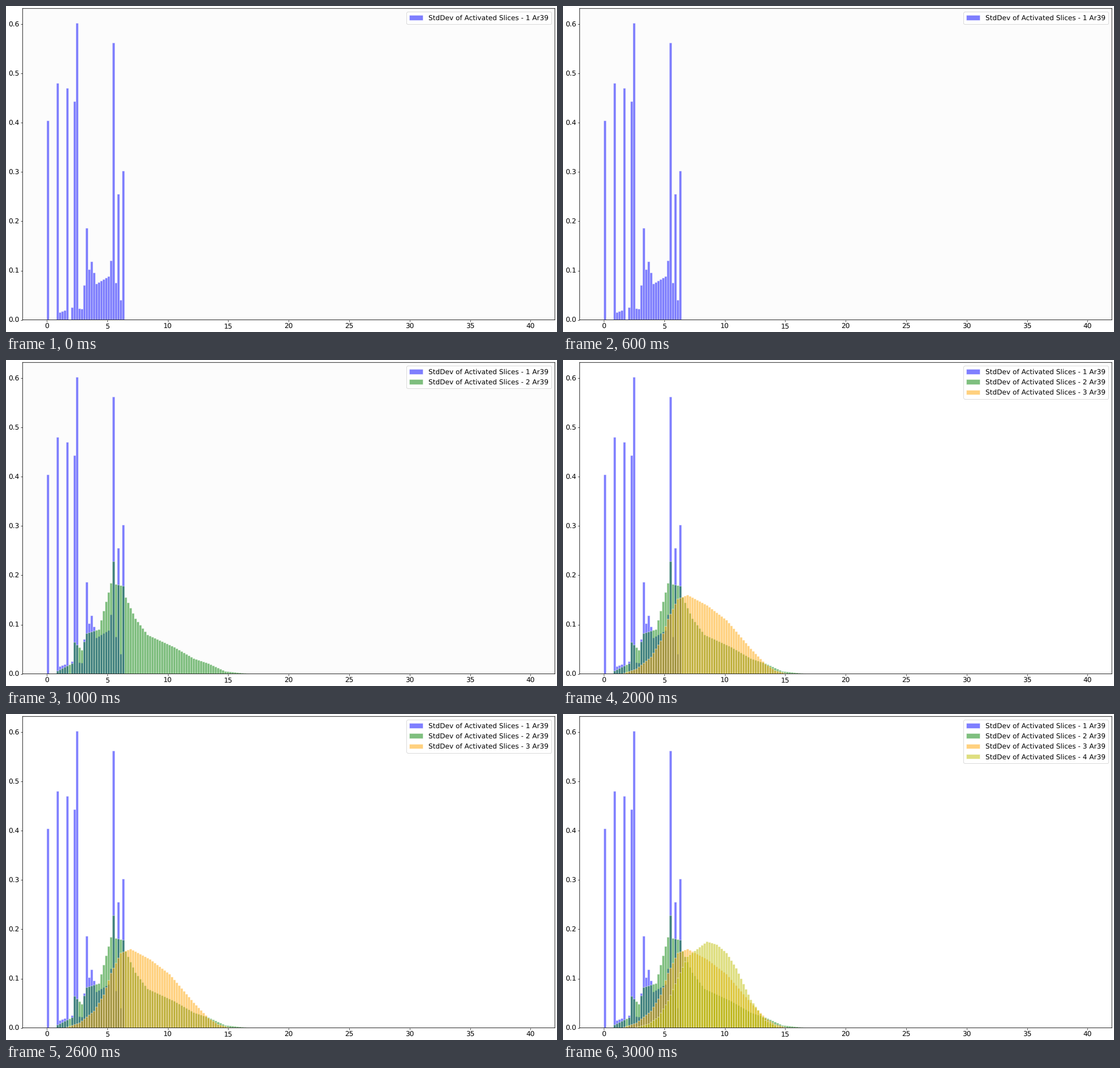
Animation of 973x576 px, one loop 4 s. Source, as a matplotlib script:

```python
import matplotlib.pyplot as plt
import numpy as np
from matplotlib.animation import FuncAnimation

WIDTH, HEIGHT, DPI = 973, 576, 64
LEFT, RIGHT, TOP, BOTTOM = 29.3, 969.2, 4.3, 554.6
EDGES = np.linspace(0, 40, 200)
BINS = np.arange(len(EDGES) - 1)

plt.rcParams.update({
    "font.family": "DejaVu Sans",
    "font.size": 13.6,
    "text.hinting": "none",
    "axes.linewidth": 0.95,
})


def density(*knots, spikes=()):
    """Straight slopes between (bin, height) knots, with single tall bins."""
    heights = np.interp(BINS, *zip(*knots))
    for position, height in spikes:
        heights[position] = height
    return heights


SERIES = [
    ("blue", density(
        (4, 0), (5, .015), (10, .025), (14, .022), (15, .07), (18, .118),
        (20, .073), (25, .088), (26, .12), (28, .075), (30, .04), (31, 0),
        spikes=[(0, .404), (4, .48), (8, .47), (9, 0), (11, .443), (12, .602),
                (16, .186), (27, .562), (29, .255), (31, .302)])),
    ("green", density(
        (3, 0), (4, .006), (10, .021), (11, .064), (14, .048), (16, .082),
        (21, .09), (26, .184), (31, .178), (32, .155), (36, .112), (41, .079),
        (52, .054), (60, .031), (66, .021), (73, .005), (83, 0),
        spikes=[(27, .228)])),
    ("orange", density(
        (7, 0), (13, .01), (19, .034), (23, .067), (26, .111), (30, .152),
        (34, .16), (42, .139), (50, .109), (60, .051), (66, .02), (70, .007),
        (75, 0))),
    ("y", density(
        (12, 0), (18, .008), (22, .022), (26, .055), (30, .101), (34, .145),
        (42, .175), (46, .169), (50, .152), (54, .121), (60, .057), (66, .015),
        (72, 0))),
]

fig = plt.figure(figsize=(WIDTH / DPI, HEIGHT / DPI), dpi=DPI,
                 facecolor="white")
ax = fig.add_axes([LEFT / WIDTH, 1 - BOTTOM / HEIGHT,
                   (RIGHT - LEFT) / WIDTH, (BOTTOM - TOP) / HEIGHT])


def draw(step):
    ax.clear()
    ax.set_facecolor("#fcfcfc" if step < 2 else "white")
    for count, (color, heights) in enumerate(SERIES[:step + 1], 1):
        ax.bar(EDGES[:-1], heights, EDGES[1], align="edge", color=color,
               edgecolor="white", linewidth=1, alpha=0.5, snap=False,
               label=f"StdDev of Activated Slices - {count} Ar39")
    for spine in ax.spines.values():
        spine.set_snap(False)
    ax.set_xlim(-2, 42)
    ax.set_ylim(0, 0.632)
    ax.set_xticks(range(0, 41, 5))
    ax.set_yticks(np.arange(7) / 10)
    ax.legend(loc="upper right", labelspacing=0.55, borderpad=0.42)
    return ax.get_children()


anim = FuncAnimation(fig, draw, frames=len(SERIES), interval=1000,
                     init_func=lambda: draw(0), repeat=True, repeat_delay=0)
plt.show()
```
